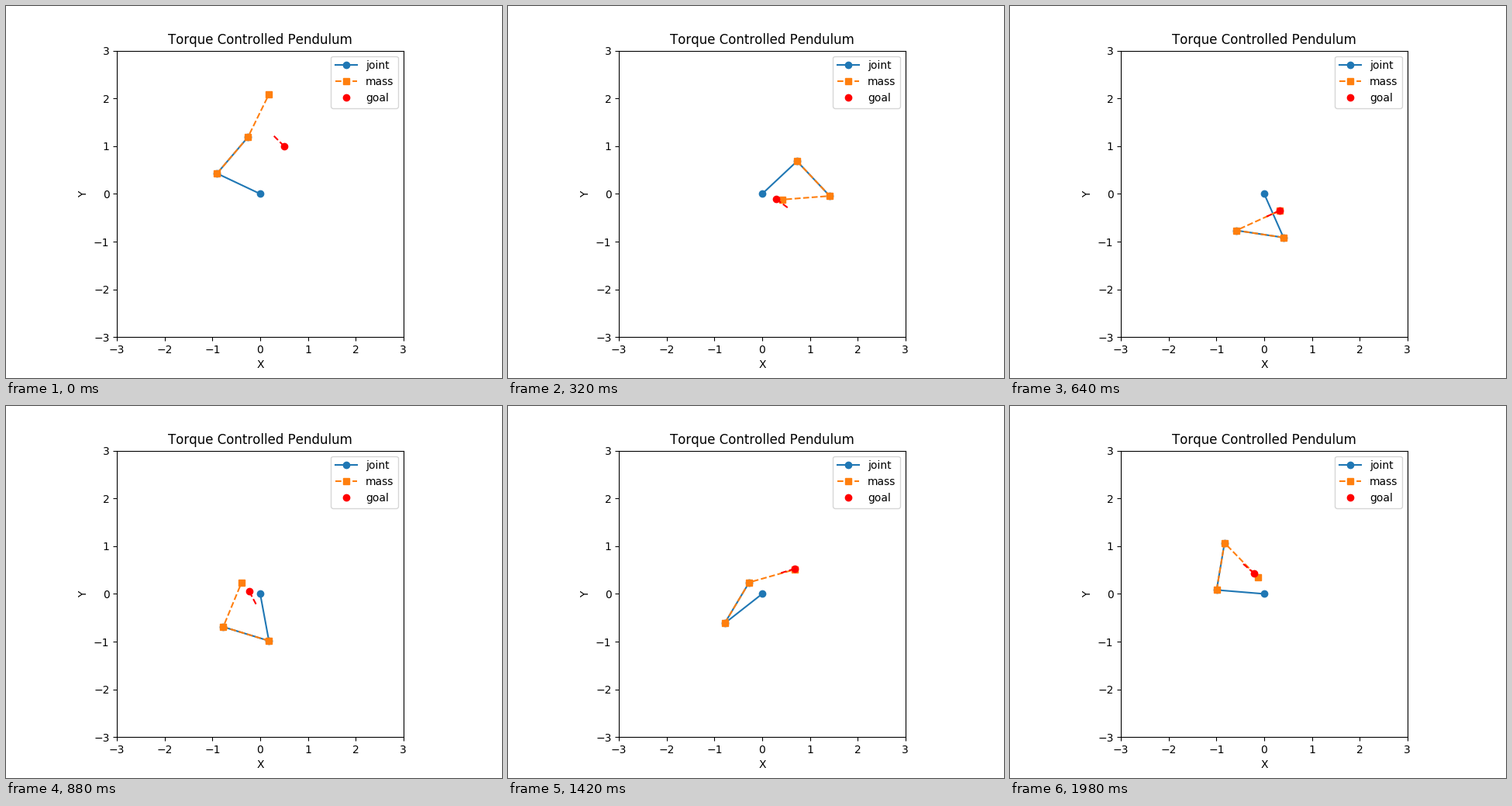
These frames come from a looping animation (640x480 px, 2 s). A matplotlib script:

```python
import numpy as np
import matplotlib.pyplot as plt
from matplotlib.animation import FuncAnimation

FRAMES = 100
INTERVAL = 20
SETTLE = 3.35     # time scale of the joint response, in frames
TAIL = 0.3        # length of the goal's heading mark

# Tip poses (x, y, heading in degrees): the start, then each goal in turn
WAYPOINTS = [
    (0.184, 2.087, 63.9),
    (0.5, 1.0, -45),
    (0.292, -0.107, 143),
    (0.325, -0.351, 24.5),
    (-0.4, 0.3, 60),
    (-0.229, 0.05, 118),
    (-0.227, -0.091, 122),
    (0.682, 0.526, 17),
    (0.594, -0.733, -115),
    (0.032, -0.675, -86),
    (-0.211, 0.429, -41),
]
# A new goal appears at a steady pace once the first one is reached
STARTS = np.append(0, np.arange(12, FRAMES, 10.25))


def unit(deg):
    return np.array([np.cos(np.radians(deg)), np.sin(np.radians(deg))])


def inverse(x, y, heading):
    """Joint angles that put the tip on a pose, elbow bent clockwise."""
    wx, wy = np.array([x, y]) - unit(heading)
    half = np.degrees(np.arccos(np.hypot(wx, wy) / 2))
    q1 = np.degrees(np.arctan2(wy, wx)) + half
    q2 = -2 * half
    q3 = (heading - q1 - q2 + 180) % 360 - 180
    return np.array([q1, q2, q3])


def chain(q):
    """Positions of base, elbow, wrist and tip."""
    links = [unit(a) for a in np.cumsum(q)]
    return np.vstack([[0, 0], np.cumsum(links, axis=0)])


aims = [inverse(*pose) for pose in WAYPOINTS]

plt.rcParams["text.kerning_factor"] = 6
fig, ax = plt.subplots(figsize=(6.4, 4.8), dpi=100)
ax.set_aspect("equal")
ax.set_xlim(-3, 3)
ax.set_ylim(-3, 3)
ax.set_xticks(range(-3, 4))
ax.set_yticks(range(-3, 4))
ax.set_xlabel("X")
ax.set_ylabel("Y")
ax.set_title("Torque Controlled Pendulum")

joint, = ax.plot([], [], "o-", color="C0", label="joint")
mass, = ax.plot([], [], "s--", color="C1", label="mass")
goal, = ax.plot([], [], "ro", label="goal")
mark, = ax.plot([], [], "r--")
ax.legend(loc="upper right")


def draw(i):
    leg = np.searchsorted(STARTS, i, side="right")
    error = np.exp(-((i - STARTS[leg - 1]) / SETTLE) ** 2)
    pts = chain(aims[leg] + (aims[leg - 1] - aims[leg]) * error)
    joint.set_data(*pts[:3].T)
    mass.set_data(*pts[1:].T)

    x, y, heading = WAYPOINTS[leg]
    tx, ty = np.array([x, y]) - TAIL * unit(heading)
    goal.set_data([x], [y])
    mark.set_data([x, tx], [y, ty])
    return joint, mass, goal, mark


anim = FuncAnimation(fig, draw, frames=FRAMES, interval=INTERVAL,
                     repeat=True, repeat_delay=0)
plt.show()
```
